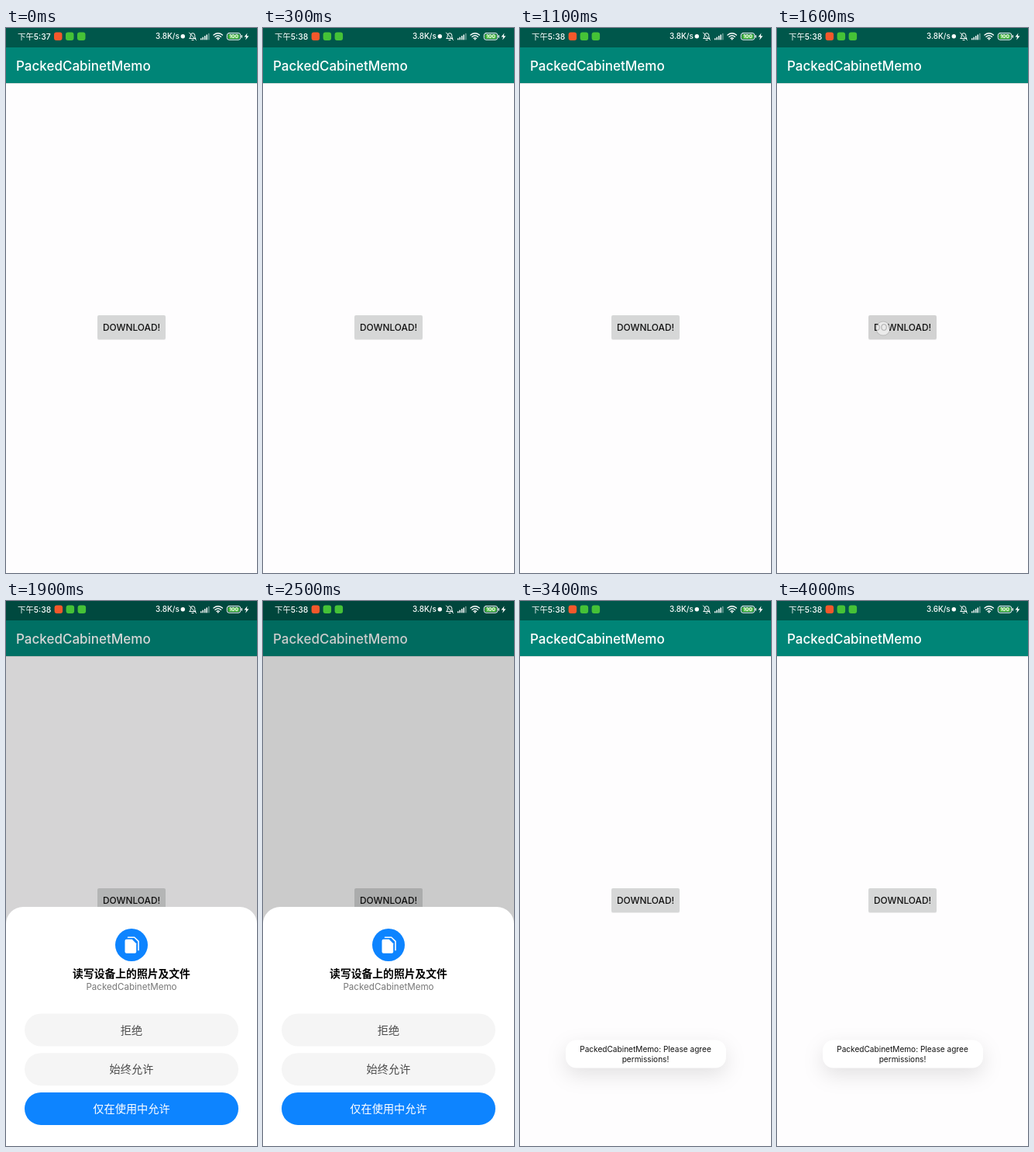
An HTML page that plays this animation: 324 px wide and 702 px high, repeating every 4100 ms.

```html
<!DOCTYPE html>
<html lang="zh-CN">
<head>
<meta charset="utf-8">
<title>Permission request</title>
<style>
  html, body { margin: 0; width: 100%; height: 100%; overflow: hidden; background: #fefdfe; }
  svg { display: block; width: 324px; height: 702px; }
  text { font-family: Inter, "Noto Sans CJK SC", "Noto Sans CJK", sans-serif; font-weight: 500; }
  .mid { text-anchor: middle; }
  .status { fill: #fff; font-size: 10.4px; }
  .line { fill: none; stroke: #fff; stroke-linecap: round; stroke-linejoin: round; }
  .choice { font-size: 14.2px; fill: #4d4d4d; }
  .toast { font-size: 10.1px; font-weight: 400; fill: #111; }
  #notice { filter: drop-shadow(0 9px 13px rgba(0, 0, 0, .11)); }
</style>
</head>
<body>
<svg viewBox="0 0 324 702">
  <rect width="324" height="702" fill="#fefdfe"/>
  <rect y="71" width="324" height="1" fill="#000" opacity=".1"/>
  <rect width="324" height="71" fill="#008577"/>
  <rect width="324" height="25" fill="#00574b"/>
  <text x="13" y="54.5" font-size="17" fill="#fff">PackedCabinetMemo</text>

  <g>
    <rect x="118" y="371" width="88" height="31" rx="2" fill="#000" opacity=".07"/>
    <rect id="button" x="118" y="370" width="88" height="31" rx="2" fill="#d6d7d7"/>
    <text class="mid" x="162" y="389.5" font-size="11.9" fill="#111" style="font-weight:450">DOWNLOAD!</text>
  </g>
  <g id="touch">
    <circle cx="137" cy="387" r="9.5" fill="#000" opacity=".1"/>
    <circle cx="137" cy="387" r="8.6" fill="#fff" opacity=".7"/>
  </g>

  <rect id="dim" width="324" height="702"/>

  <g class="status">
    <text id="clock" x="15" y="14.6"></text>
    <g id="apps">
      <rect x="62" y="5.5" width="10.5" height="10.5" rx="3" fill="#f4582b"/>
      <rect x="77" y="5.5" width="10.5" height="10.5" rx="3" fill="#45c237"/>
      <rect x="92" y="5.5" width="10.5" height="10.5" rx="3" fill="#45c237"/>
    </g>
    <text id="speed" x="193" y="14.3" font-size="9.9"></text>
    <circle cx="228.3" cy="10.8" r="2.7"/>
    <g class="line" stroke-width="1">
      <path d="M237 13.5h8l-1.2-1.8V9.5a2.8 2.8 0 0 0-5.6 0v2.2zM240 15.5h2M236.5 6l9 9.5"/>
      <path d="M268 9q5.700-4.600 11.400 0M270 11.200q3.700-3 7.400 0M272 13.300q1.700-1.300 3.400 0" stroke-width="1.4"/>
      <rect x="285.300" y="6.600" width="17.400" height="8.600" rx="2.600"/>
      <path d="M304.300 9.700v2.400" stroke-width="1.300"/>
    </g>
    <rect x="286.600" y="7.900" width="14.800" height="6" rx="1.400" fill="#43b63a"/>
    <g id="bars"></g>
    <circle cx="273.700" cy="14.600" r="1"/>
    <text class="mid" x="294" y="13.300" font-size="6.600" style="font-weight:700">100</text>
    <path d="M311.500 6.500l-4 5h2.600l-.9 4 4.200-5.200h-2.700z"/>
  </g>

  <g id="sheet">
    <path d="M0 720V416a22 22 0 0 1 22-22H302a22 22 0 0 1 22 22V720z" fill="#fff"/>
    <circle cx="162" cy="443" r="21" fill="#0d84ff"/>
    <path d="M157.500 433.200h8.200l5.300 5.200v11.300" fill="none" stroke="#fff" stroke-width="1.600" stroke-linejoin="round" stroke-linecap="round"/>
    <path d="M155.500 435.800h7.200l5.500 5.400v10.600a2 2 0 0 1-2 2h-10.700a2 2 0 0 1-2-2v-14a2 2 0 0 1 2-2z" fill="#fff"/>
    <text class="mid" x="162" y="485.200" font-size="13.800" fill="#000" style="font-weight:600">读写设备上的照片及文件</text>
    <text class="mid" x="162" y="501" font-size="11.600" fill="#777" style="font-weight:400">PackedCabinetMemo</text>
    <g id="choices"></g>
  </g>

  <g id="notice">
    <rect x="59" y="565.500" width="207" height="36" rx="14" fill="#fff"/>
    <text class="toast mid" x="162" y="581">PackedCabinetMemo: Please agree</text>
    <text class="toast mid" x="162" y="594">permissions!</text>
  </g>
</svg>
<script>
const LOOP = 4100, STEP = 100;
const $ = id => document.getElementById(id);

function add(parent, tag, attrs, label = '') {
  const el = document.createElementNS('http://www.w3.org/2000/svg', tag);
  for (const key in attrs) el.setAttribute(key, attrs[key]);
  el.textContent = label;
  parent.append(el);
}

['拒绝', '始终允许', '仅在使用中允许'].forEach((label, i) => {
  const y = 531.5 + i * 50.7, main = i === 2;
  add($('choices'), 'rect', { x: 24, y, width: 276, height: 42, rx: 21, fill: main ? '#0d84ff' : '#f5f5f5' });
  add($('choices'), 'text', { class: 'choice mid', x: 162, y: y + 26.2, style: main ? 'fill:#fff' : '' }, label);
});

for (let i = 0; i < 5; i++) {
  const h = 2 + i * 1.6;
  add($('bars'), 'rect', { x: 251 + i * 2.5, y: 15.3 - h, width: 1.5, height: h, opacity: i > 3 ? .45 : 1 });
}

// [time, value] steps, each held until the next
const tracks = {
  clock: [[0, '下午5:37'], [300, '下午5:38']],
  speed: [[0, '3.8K/s'], [3700, '3.6K/s']],
  touch: [[0, 0], [1500, 1], [1700, 0]],
  dim: [[0, 0], [1800, .09], [1900, .16], [2000, .2], [2800, .1], [2900, 0]],
  sheet: [[0, 320], [1800, 70], [1900, 0], [2800, 150], [2900, 320]],
  notice: [[0, 0], [3000, .5], [3100, 1]]
};

const at = (name, t) => tracks[name].filter(step => step[0] <= t).pop()[1];

function draw(t) {
  $('clock').textContent = at('clock', t);
  $('speed').textContent = at('speed', t);
  $('apps').setAttribute('transform', `translate(${t < 300 ? 0 : .6} 0)`);
  const touched = at('touch', t);
  $('touch').style.opacity = touched;
  $('button').setAttribute('fill', touched ? '#d2d2d2' : '#d6d7d7');
  $('dim').style.opacity = at('dim', t);
  $('sheet').setAttribute('transform', `translate(0 ${at('sheet', t)})`);
  $('notice').style.opacity = at('notice', t);
}

const start = performance.now();
function tick() {
  const t = (performance.now() - start) % LOOP;
  draw(Math.floor(t / STEP) * STEP);
  requestAnimationFrame(tick);
}
tick();
</script>
</body>
</html>
```
